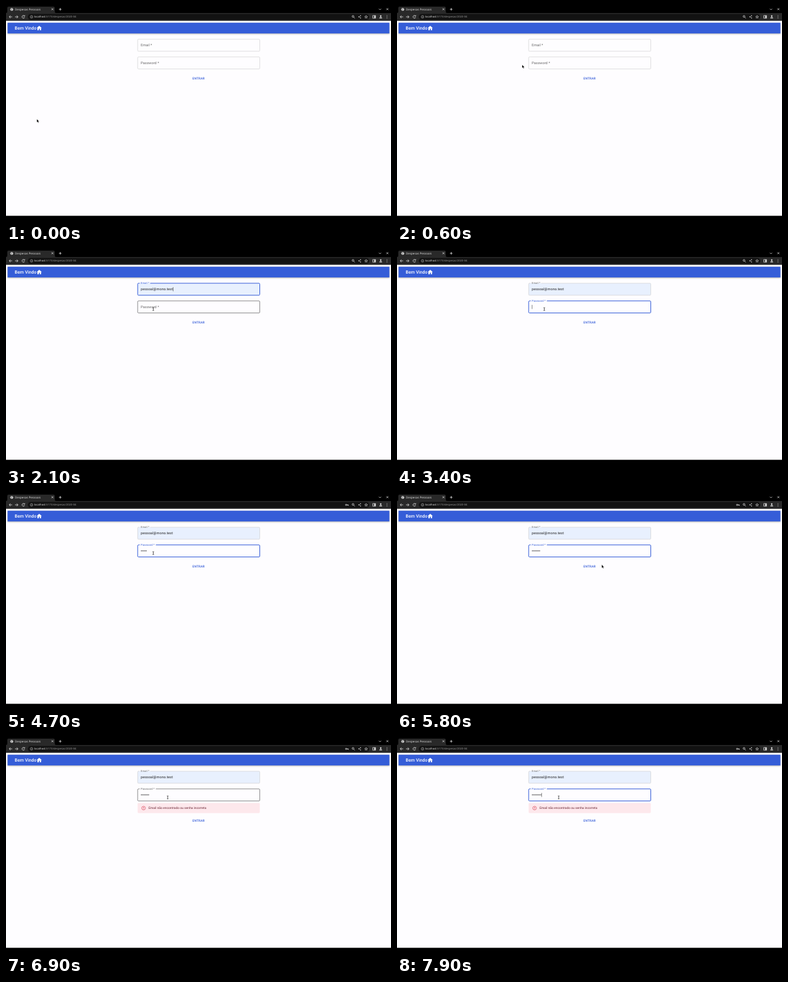
Animation, 600 px wide and 338 px high, one loop 8000 ms. Source, as an HTML page:

```html
<!DOCTYPE html>
<html lang="pt-BR">
<head>
<meta charset="utf-8">
<title>Despesas Pessoais</title>
<style>
  html, body { margin: 0; width: 100%; height: 100%; overflow: hidden; background: #fefdff; }
  svg { display: block; width: 100%; height: 100%; }
  text { font-family: Roboto, sans-serif; text-rendering: geometricPrecision; white-space: pre; }
  .ui { font-family: "Noto Sans", sans-serif; }
  .icon { fill: none; stroke: #ddd; stroke-width: .8; }
  .solid { fill: #ddd; }
  .body { font-size: 5.53px; letter-spacing: .052px; }
</style>
</head>
<body>
<svg viewBox="0 0 600 338" preserveAspectRatio="none">
  <defs>
    <filter id="shadow" x="-10%" y="-30%" width="120%" height="180%">
      <feDropShadow dx="0" dy=".8" stdDeviation=".8" flood-opacity=".35"/>
    </filter>
    <clipPath id="buttonClip"><rect x="288" y="106.7" width="24.5" height="12.6" rx="1.4"/></clipPath>
  </defs>

  <rect width="600" height="338" fill="#fefdff"/>
  <rect width="600" height="23.2" fill="#000"/>
  <path d="M0 11q2 0 2-2V3q0-2 2-2H74q2 0 2 2V9q0 2 2 2H600V23H0z" fill="#292929"/>
  <rect x="34" y="12.4" width="532" height="9.2" rx="4.6" fill="#121212"/>
  <g class="icon">
    <path d="M71 3.7l2.8 2.8m0-2.8L71 6.5M84.5 3.2v4m-2-2h4M581.2 4.4l1.6 1.6 1.6-1.6M593 3.6l2.8 2.8m0-2.8L593 6.4"/>
    <path d="M9.6 17H5m2-2.1L4.9 17 7 19.1M14 17h4.6m-2-2.1l2.1 2.1-2.1 2.1"/>
    <path d="M28.7 15.6a2.1 2.1 0 1 0 .4 2M29.1 14.4v1.6h-1.6"/>
    <path d="M39.8 16.7v1.5m0-2.7v.6" stroke-width=".5"/>
    <circle cx="39.8" cy="17" r="2" stroke-width=".5"/>
    <circle cx="540.8" cy="16.3" r="1.4"/><path d="M541.9 17.5l1.7 1.7"/>
    <path d="M552.6 15.3l-2.8 1.6 2.8 1.8" stroke-width=".5"/>
    <path d="M561.2 14.8l.6 1.5 1.7.1-1.3 1.1.4 1.6-1.4-.9-1.4.9.4-1.6-1.3-1.1 1.7-.1z" stroke-width=".6"/>
    <rect x="571.7" y="15" width="4.2" height="4"/>
  </g>
  <g class="solid">
    <circle cx="9" cy="5.2" r="2.3"/>
    <circle cx="552.6" cy="15.3" r=".7"/><circle cx="549.8" cy="16.9" r=".7"/><circle cx="552.6" cy="18.7" r=".7"/>
    <rect x="573.8" y="15" width="2.1" height="4"/>
    <circle cx="584" cy="15.7" r="1.2"/><path d="M581.7 19.2q0-1.7 2.3-1.7t2.3 1.7z"/>
    <circle cx="593.8" cy="15" r=".5"/><circle cx="593.8" cy="17" r=".5"/><circle cx="593.8" cy="19" r=".5"/>
  </g>
  <path d="M7.2 4.3l1.5.3.4 1.2-1 .8M9.4 3.2l.4 1 1.1.1" fill="none" stroke="#333" stroke-width=".6"/>
  <g id="key">
    <circle cx="530" cy="17" r="1" class="icon"/>
    <path d="M531 17h2.6v1.3m-1-1.3v1" class="icon"/>
  </g>
  <text class="ui" x="14" y="6.8" font-size="4.55" fill="#ddd">Despesas Pessoais</text>
  <text class="ui" x="44" y="18.4" font-size="4.2" fill="#999"><tspan fill="#e4e4e4">localhost</tspan>:5173/despesas/2020-04</text>

  <rect x="2.5" y="26.2" width="595" height="16.7" fill="#365dd8" filter="url(#shadow)"/>
  <text x="13.6" y="37" font-size="6.95" font-weight="500" fill="#fff">Bem Vindo</text>
  <path d="M51 37.9v-2.5h1.6v2.5h2v-3.4h1.2l-4-3.6-4 3.6h1.2v3.4z" fill="#fff"/>
  <rect y="328.3" width="600" height="9.7" fill="#000"/>

  <g id="fields"></g>

  <g id="alert">
    <rect x="205.2" y="101.8" width="190.3" height="15.6" rx="1.4" fill="#fde8ec"/>
    <circle cx="214.4" cy="109.7" r="2.8" fill="none" stroke="#d8364c" stroke-width=".65"/>
    <path d="M214.4 108v2.1m0 .6v.7" stroke="#d8364c" stroke-width=".7"/>
    <text x="222.2" y="111.4" font-size="4.84" letter-spacing=".052" fill="#641c2b">Email não encontrado ou senha incorreta</text>
  </g>

  <g id="button">
    <rect id="buttonHover" x="288" y="106.7" width="24.5" height="12.6" rx="1.4" fill="#365dd8" opacity=".05"/>
    <g clip-path="url(#buttonClip)"><circle id="ripple" cx="306" cy="113" fill="#365dd8"/></g>
    <text x="290.6" y="114.8" font-size="4.84" font-weight="500" letter-spacing=".138" fill="#365dd8">ENTRAR</text>
  </g>

  <g id="dropdown">
    <rect x="237" y="73.6" width="55.5" height="14" rx=".8" fill="#fff" filter="url(#shadow)"/>
    <rect id="option" x="237" y="77" width="55.5" height="8" fill="#ececec"/>
    <text class="ui" x="240" y="82.5" font-size="4.75" fill="#222">pessoal@mono.test</text>
  </g>

  <g id="pointer">
    <path id="arrow" d="M0 0V5.1L1.2 4.1 2.1 6 3 5.6 2.2 3.8H3.8z" fill="#000" stroke="#fff" stroke-width=".35"/>
    <path id="beam" d="M-1.2 -2.4Q0 -2.4 0 -1.7 0 -2.4 1.2 -2.4M0 -1.8V1.8M-1.2 2.4Q0 2.4 0 1.7 0 2.4 1.2 2.4" fill="none" stroke="#222" stroke-width=".7"/>
    <path id="hand" d="M-.5 0q.7-.6 1.1 0V2l2.3.6q.6.3.4 1L2.8 6H0L-1.7 3.6q.4-.7 1.2 0z" fill="#fff" stroke="#000" stroke-width=".45"/>
  </g>
</svg>
<script>
const LOOP = 8000, STEP = 100, BLUE = '#365dd8';
const $ = id => document.getElementById(id);
const show = (el, on) => el.setAttribute('visibility', on ? 'visible' : 'hidden');
const set = (el, attrs) => { for (const k in attrs) el.setAttribute(k, attrs[k]); };
const within = (t, a, b) => t >= a && t < b;
const clamp = v => Math.max(0, Math.min(1, v));
const lerp = (a, b, p) => a + (b - a) * p;
const smooth = p => p * p * (3 - 2 * p);

function add(parent, tag, attrs, text = '') {
  const el = document.createElementNS('http://www.w3.org/2000/svg', tag);
  set(el, attrs);
  el.textContent = text;
  return parent.appendChild(el);
}

function makeField(top, label, notchEnd) {
  const g = add($('fields'), 'g', {});
  return {
    top, notchEnd, g,
    fill: add(g, 'rect', { x: 205.2, y: top, width: 190.3, height: 18.8, rx: 1.4, fill: '#e8f0fe' }),
    border: add(g, 'path', { fill: 'none' }),
    label: add(g, 'text', { x: 210 }, label),
    caret: add(g, 'rect', { y: top + 6.2, width: .5, height: 6.4, fill: '#222' })
  };
}

const email = makeField(52, 'Email *', 224.7);
const password = makeField(79.7, 'Password *', 233.5);
const value = add(email.g, 'text', { class: 'body', x: 210, y: 63.2, fill: '#222' }, 'pessoal@mono.test');
const dots = Array.from({ length: 8 }, (_, i) =>
  add(password.g, 'circle', { cx: 211 + 1.88 * i, cy: 88.9, r: .72, fill: '#222' }));

function drawField(f, floated, focused, hovered, caretX) {
  const { top, border, label } = f;
  const bottom = top + 18.8;
  const right = lerp(208.4, f.notchEnd, floated);
  set(border, {
    d: `M${right} ${top}H394.1q1.4 0 1.4 1.4V${bottom - 1.4}q0 1.4-1.4 1.4H206.6q-1.4 0-1.4-1.4V${top + 1.4}q0-1.4 1.4-1.4H208.4`,
    stroke: focused ? BLUE : hovered ? '#333' : '#c6c6c6',
    'stroke-width': focused ? 1 : .55
  });
  set(label, {
    y: top + lerp(11.1, 1.1, floated),
    'font-size': lerp(5.53, 4.15, floated),
    'letter-spacing': .05,
    fill: focused ? BLUE : '#666'
  });
  show(f.caret, caretX > 0);
  if (caretX > 0) f.caret.setAttribute('x', caretX);
}

const path = [
  [0, 48, 177], [100, 52, 173], [500, 170, 106], [800, 245, 64], [900, 248, 62], [1100, 248, 62],
  [1200, 247.6, 73], [1400, 251, 80], [1700, 251, 81], [1900, 238, 89], [2000, 229.5, 92.5],
  [5200, 229.5, 92.5], [5500, 290, 104], [5800, 319, 110.6], [6000, 306, 112], [6400, 306, 112],
  [6900, 252, 93], [LOOP, 252, 93]
];
const typed = [3600, 3700, 3800, 4000, 4100, 4800, 5000, 7900];

function pointerAt(t) {
  const i = path.findIndex(p => p[0] > t);
  const [t0, x0, y0] = path[i - 1], [t1, x1, y1] = path[i];
  const p = (t - t0) / (t1 - t0);
  return [lerp(x0, x1, p), lerp(y0, y1, p)];
}

function render(t) {
  const [x, y] = pointerAt(t);
  const over = top => x > 205 && x < 395.5 && y > top && y < top + 18.8;
  const menu = within(t, 1100, 1700);
  const failed = t >= 6300;
  const overEmail = over(email.top), overPassword = over(password.top) && !menu;
  const overButton = !failed && x > 288 && x < 312.5 && y > 106.7 && y < 119.3;

  const count = typed.filter(s => s <= t).length;
  dots.forEach((dot, i) => show(dot, i < count));
  const filled = t >= 1400;
  show(value, filled);
  show(email.fill, filled);
  show(password.fill, false);

  const emailFocus = within(t, 1000, 2400);
  const passFocus = within(t, 2400, 6100) || t >= 7200;
  const lastKey = Math.max(2400, ...typed.filter(s => s <= t), t >= 7200 ? 7200 : 0);
  const blinkOn = Math.floor((t - lastKey) / 500) % 2 === 0;
  drawField(email, smooth(clamp((t - 900) / 200)), emailFocus, overEmail,
    emailFocus && !within(t, 1500, 1700) ? (filled ? 260 : 210) : 0);
  drawField(password, smooth(clamp((t - 2300) / 200)), passFocus, overPassword,
    passFocus && blinkOn ? 210 + 1.9 * count : 0);

  show($('key'), count > 0);
  show($('dropdown'), menu);
  show($('option'), menu && t >= 1400);
  show($('alert'), failed);
  $('button').setAttribute('transform', `translate(0 ${failed ? 16.5 : 0})`);
  show($('buttonHover'), overButton);
  const grow = clamp((t - 6050) / 550);
  set($('ripple'), {
    r: t < 6100 ? 0 : 20 * smooth(grow) * .75,
    opacity: .28 * (1 - clamp((t - 6400) / 500))
  });

  $('pointer').setAttribute('transform', `translate(${x} ${y})`);
  const beam = overEmail || overPassword;
  show($('beam'), beam);
  show($('hand'), overButton);
  show($('arrow'), !beam && !overButton);
}

const start = performance.now();
function tick(now) {
  const t = Math.max(0, now - start) % LOOP;
  render(Math.floor(t / STEP) * STEP);
  requestAnimationFrame(tick);
}
render(0);
requestAnimationFrame(tick);
</script>
</body>
</html>
```
